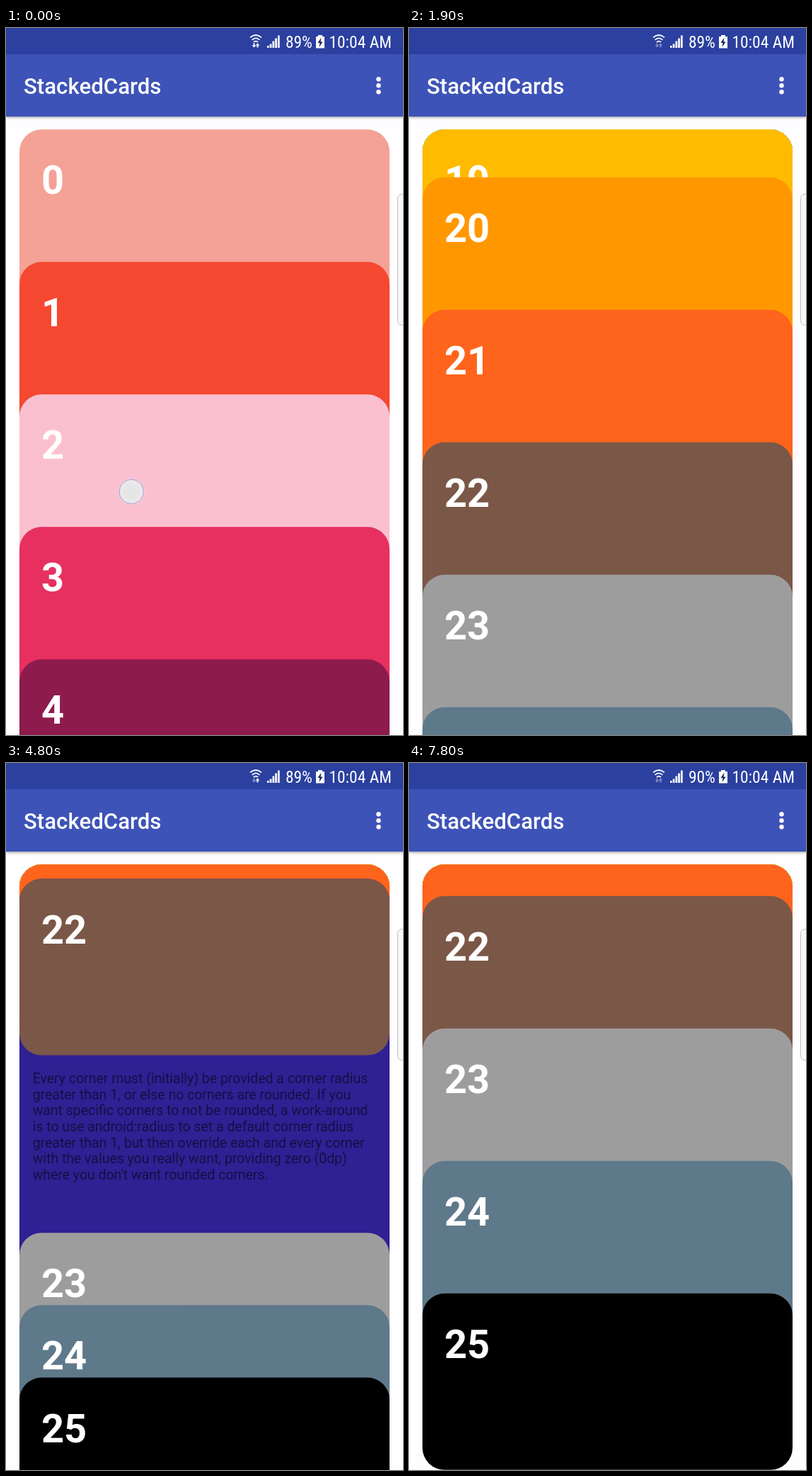
An HTML page for the animation above (8 s loop, 561 by 998 pixels).

```html
<!DOCTYPE html>
<html lang="en">
<head>
<meta charset="utf-8">
<title>StackedCards</title>
<style>
  html, body { margin: 0; width: 100%; height: 100%; overflow: hidden; background: #fefdff; }
  #stage { position: relative; width: 561px; height: 998px; overflow: hidden; background: #fefdff; font-family: Roboto, sans-serif; }
  #chrome { position: absolute; left: 0; top: 0; z-index: 2; }
  #bar { position: absolute; z-index: 1; width: 561px; height: 124.5px; background: linear-gradient(#2b409f 37.5px, #3d53b7 37.5px); box-shadow: 0 1px 4px rgba(0, 0, 0, .45); }
  .card { position: absolute; left: 18.7px; top: 0; width: 523.6px; border-radius: 31.2px; }
  .head { position: absolute; inset: 0 0 auto; border-radius: 31.2px; }
  .num { position: absolute; left: 31.2px; top: 39.2px; font: 700 56px/66px Roboto, sans-serif; color: #fff; }
  .note { position: absolute; left: 19px; top: 271px; font: 19.45px/22.67px Roboto, sans-serif; color: rgba(0, 0, 0, .54); white-space: pre; }
  #dot { position: absolute; z-index: 3; left: -18px; top: -18px; width: 33px; height: 33px; border: 1.5px solid #aaa0d0; border-radius: 50%; background: radial-gradient(#e2e2e2, #eeedf0); box-shadow: 0 0 4px 1px rgba(225, 220, 245, .6); }
  .status { font: 23.5px "Roboto Condensed", Roboto, sans-serif; font-stretch: condensed; fill: #fff; text-anchor: end; }
</style>
</head>
<body>
<div id="stage">
  <div id="bar"></div>
  <svg id="chrome" width="561" height="998">
    <g fill="none" stroke="#fff" stroke-width="1.8">
      <path d="M345 13.4Q353 6.6 361 13.4M347.6 16.8Q353 12 358.400 16.800M350 20Q353 17.300 356 20"/>
    </g>
    <path id="down" d="M350.500 27.500l-3-3h2v-3h2v3h2z" fill="#fff"/>
    <path id="up" d="M355.500 21.500l3 3h-2v3h-2v-3h-2z" fill="#fff"/>
    <path d="M369 25h2.500v3h-2.500zM372.700 22.500h2.700v5.500h-2.700zM376.500 18.500h2.700v9.500h-2.700zM380.200 14.500h2.700v13.500h-2.700zM384 10.500h2.700v17.500h-2.700z" fill="#fff"/>
    <text id="level" class="status" x="433" y="28"></text>
    <path d="M441 10h6v2h3v16.500h-12v-16.500h3z" fill="#fff"/>
    <path d="M445.500 13.500l-5 7.500h3l-1 6 5-7.500h-3z" fill="#14205c"/>
    <text class="status" x="545" y="28">10:04 AM</text>
    <text x="25" y="93" font-family="Roboto, sans-serif" font-weight="500" font-size="31.2" fill="#fff">StackedCards</text>
    <g fill="#fff"><circle cx="526.500" cy="72.300" r="3.200"/><circle cx="526.500" cy="81.200" r="3.200"/><circle cx="526.500" cy="90.200" r="3.200"/></g>
    <rect x="553.500" y="234.500" width="20" height="185" rx="6" fill="#f8f8f9" stroke="#bebec2"/>
  </svg>
  <div id="dot"></div>
</div>
<script>
const LOOP = 8000, STEP = 100;
const TOP = 143.3, GAP = 187, HEAD = 249.3, TALL = 623.5, OVERLAP = 62.3;
const STACK_TOP = 904.5, STACK_GAP = 31.2, BODY = '#2f2093';

const colors = ('#f4a196 #f44831 #fbc0d0 #e73060 #8e1b4e #e1bee7 #9c27b0 #4a148c #b388ff ' +
  '#6840b7 #2f2093 #385dff #1aa8fb #18b4dd #1b9599 #439f4a #87b347 #cddc39 #ffeb3b ' +
  '#ffbb00 #ff9800 #ff641c #7b5747 #9e9d9e #5e798a #000').split(' ');

const note = `Every corner must (initially) be provided a corner radius
greater than 1, or else no corners are rounded. If you
want specific corners to not be rounded, a work-around
is to use android:radius to set a default corner radius
greater than 1, but then override each and every corner
with the values you really want, providing zero (0dp)
where you don't want rounded corners.`;

// Scroll offset at each 100 ms: two flings, the second runs to the end of the list
const scrolls = [0, 140, 530, 1000, 1370, 1665, 1906, 2110, 2280, 2420, 2545, 2649, 2730, 2830,
  3130, 3420, 3650, 3835, 3985, 4109, 4210, 4290, 4355, 4408, 4448, 4477, 4496, 4506];

const opens = [
  { card: 22, from: 3050, open: 3560, close: 4550, end: 5080 },
  { card: 23, from: 5620, open: 6100, close: 7100, end: 7750 }
];
const touches = [[0, 100, 177.7, 655], [100, 200, 179, 515], [2800, 2900, 175.5, 347], [5600, 5700, 190, 473]];

const $ = id => document.getElementById(id);
const clamp = x => Math.min(1, Math.max(0, x));
const ease = x => (1 - Math.cos(Math.PI * clamp(x))) / 2;

function add(parent, cls, text = '') {
  const el = document.createElement('div');
  el.className = cls;
  el.textContent = text;
  parent.append(el);
  return el;
}

let next = TOP;
const cards = colors.map((color, i) => {
  const height = i === 10 ? TALL : i === 6 ? HEAD + OVERLAP : HEAD;
  const el = add($('stage'), 'card');
  const text = add(el, 'note', note);
  const head = add(el, 'head');
  head.style.height = height + 'px';
  head.style.background = color;
  add(head, 'num', i);
  const base = next;
  next += i === 6 || i === 10 ? height - OVERLAP : GAP;
  return { el, text, height, base };
});

function scrollAt(t) {
  const k = Math.min(t / STEP, scrolls.length - 1);
  const i = Math.floor(k);
  const a = scrolls[i], b = scrolls[i + 1] ?? a;
  return a + (b - a) * (k - i);
}

function draw(t) {
  const scroll = scrollAt(t);
  const act = opens.find(o => t > o.from && t < o.end);
  const p = act ? ease((t - act.from) / (act.open - act.from)) - ease((t - act.close) / (act.end - act.close)) : 0;

  cards.forEach((c, i) => {
    const rest = Math.max(TOP, c.base - scroll);
    const goal = !act || i <= act.card ? TOP : STACK_TOP + STACK_GAP * (i - act.card - 1);
    const y = rest + (goal - rest) * p;
    const isOpen = !!act && act.card === i;
    c.el.style.transform = `translateY(${y}px)`;
    c.el.style.visibility = y < 998 ? 'visible' : 'hidden';
    c.el.style.height = (isOpen ? TALL : c.height) + 'px';
    c.el.style.background = isOpen ? BODY : 'none';
    c.text.style.display = isOpen ? 'block' : 'none';
  });

  const touch = touches.find(([a, b]) => t >= a && t < b);
  $('dot').style.display = touch ? 'block' : 'none';
  if (touch) $('dot').style.transform = `translate(${touch[2]}px, ${touch[3]}px)`;

  $('level').textContent = t < 5600 ? '89%' : '90%';
  $('down').style.opacity = t < 1900 ? 1 : .4;
  $('up').style.opacity = t < 1900 || (t >= 4600 && t < 6900) ? 1 : .4;
}

const start = performance.now();
function tick() {
  const t = (performance.now() - start) % LOOP;
  draw(Math.floor(t / STEP) * STEP);
  requestAnimationFrame(tick);
}
tick();
</script>
</body>
</html>
```
